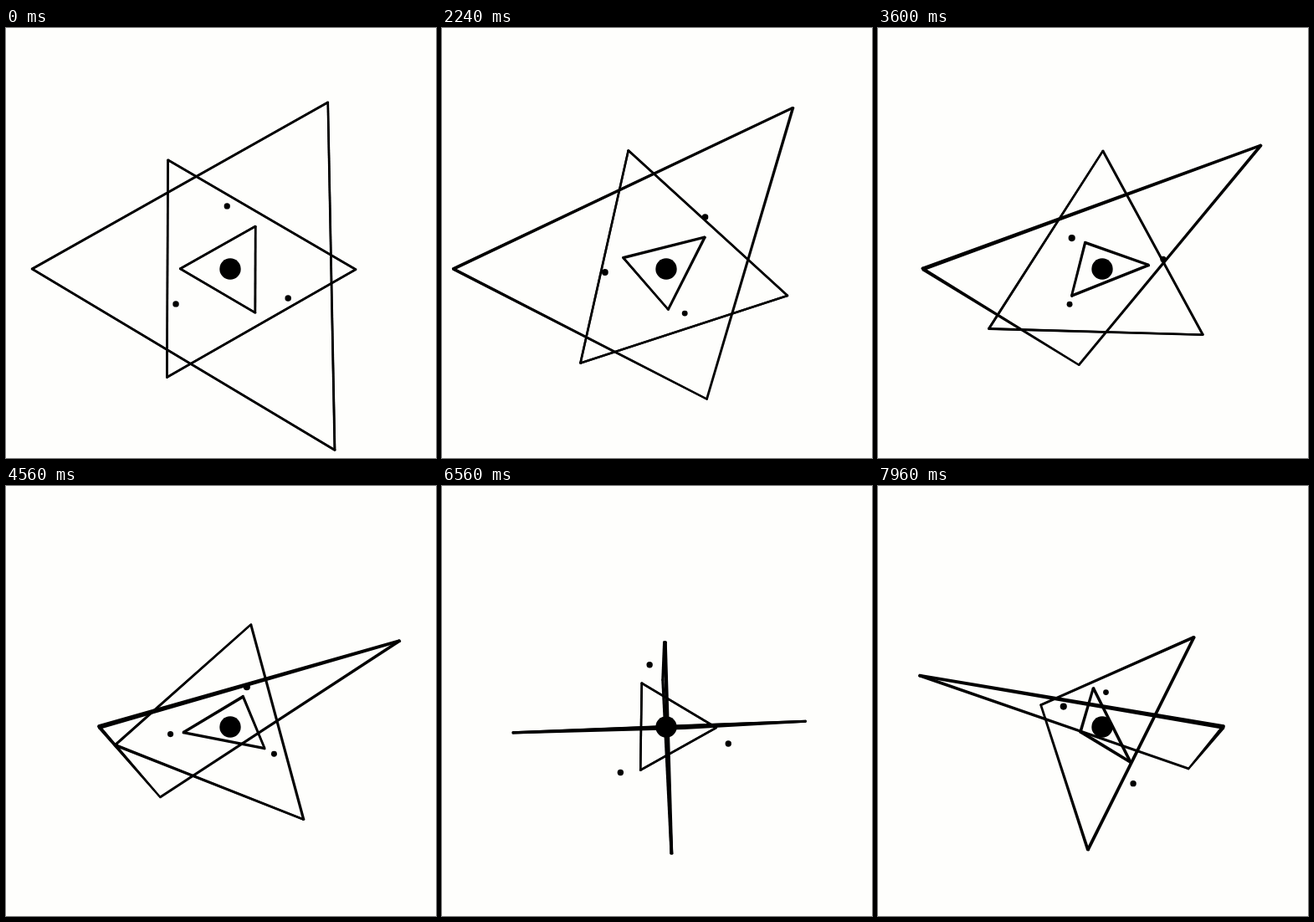
An HTML page with a canvas for the animation above (8 s loop, 514x514 px).

```html
<!DOCTYPE html>
<html lang="en">
<head>
<meta charset="utf-8">
<title>Nested gyroscope triangles</title>
<style>
  html, body { margin: 0; width: 100%; height: 100%; overflow: hidden; background: #fefefc; }
  canvas { display: block; width: 514px; height: 514px; }
</style>
</head>
<body>
<canvas id="stage" width="514" height="514"></canvas>
<script>
const SIZE = 514, LOOP = 8000, STEP = 40;
const CX = 268, CY = 288, FOCAL = 650;
const LINE = 2.5, DEPTH = 0.65;
const SPIN = 0.2533; // radians per second
const canvas = document.getElementById('stage');
const ctx = canvas.getContext('2d');
const ratio = window.devicePixelRatio || 1;
canvas.width = canvas.height = Math.round(SIZE * ratio);
ctx.scale(canvas.width / SIZE, canvas.width / SIZE);

const rotX = (a) => ([x, y, z]) => {
  const c = Math.cos(a), s = Math.sin(a);
  return [x, y * c - z * s, y * s + z * c];
};
const rotY = (a) => ([x, y, z]) => {
  const c = Math.cos(a), s = Math.sin(a);
  return [x * c + z * s, y, z * c - x * s];
};
// Rightmost rotation is applied first.
const chain = (...steps) => (p) => steps.reduceRight((q, step) => step(q), p);

function project([x, y, z]) {
  const s = FOCAL / (FOCAL - z);
  return { x: CX + x * s, y: CY + y * s, s };
}

// Three points on a circle in the local plane.
function corners(radius, angle, z = 0) {
  return [0, 1, 2].map((i) => {
    const a = angle + i * Math.PI * 2 / 3;
    return [radius * Math.cos(a), radius * Math.sin(a), z];
  });
}

function disc(x, y, r) {
  ctx.beginPath();
  ctx.arc(x, y, r, 0, Math.PI * 2);
  ctx.fill();
}

// A stroke whose width follows perspective from one end to the other.
function taper(p, q) {
  const dx = q.x - p.x, dy = q.y - p.y;
  const len = Math.hypot(dx, dy) || 1;
  const nx = -dy / len * LINE / 2, ny = dx / len * LINE / 2;
  ctx.beginPath();
  ctx.moveTo(p.x + nx * p.s, p.y + ny * p.s);
  ctx.lineTo(q.x + nx * q.s, q.y + ny * q.s);
  ctx.lineTo(q.x - nx * q.s, q.y - ny * q.s);
  ctx.lineTo(p.x - nx * p.s, p.y - ny * p.s);
  ctx.fill();
  disc(p.x, p.y, LINE / 2 * p.s);
}

// Two stacked layers give the frame its slight depth.
function triangle(radius, angle, turn) {
  for (const z of [-DEPTH, DEPTH]) {
    const pts = corners(radius, angle, z).map((p) => project(turn(p)));
    pts.forEach((p, i) => taper(p, pts[(i + 1) % 3]));
  }
}

function draw(ms) {
  const turned = SPIN * ms / 1000;
  const yaw = turned - 0.035, pitch = turned - 0.13;
  const forth = chain(rotY(yaw), rotX(-pitch));
  const back = chain(rotY(-yaw), rotX(pitch));
  const middle = chain(forth, back);
  const inner = chain(middle, forth);

  ctx.fillStyle = '#fefefc';
  ctx.fillRect(0, 0, SIZE, SIZE);
  ctx.fillStyle = '#000';
  triangle(240, Math.PI, forth);
  triangle(150, 0, middle);
  triangle(60, Math.PI, inner);
  for (const p of corners(77, 0.465 + turned / 2)) {
    const d = project(inner(p));
    disc(d.x, d.y, 3.7 * d.s);
  }
  disc(CX, CY, 12.7);
}

const start = performance.now();
function tick() {
  const ms = (performance.now() - start) % LOOP;
  draw(Math.floor(ms / STEP) * STEP);
  requestAnimationFrame(tick);
}
tick();
</script>
</body>
</html>
```
